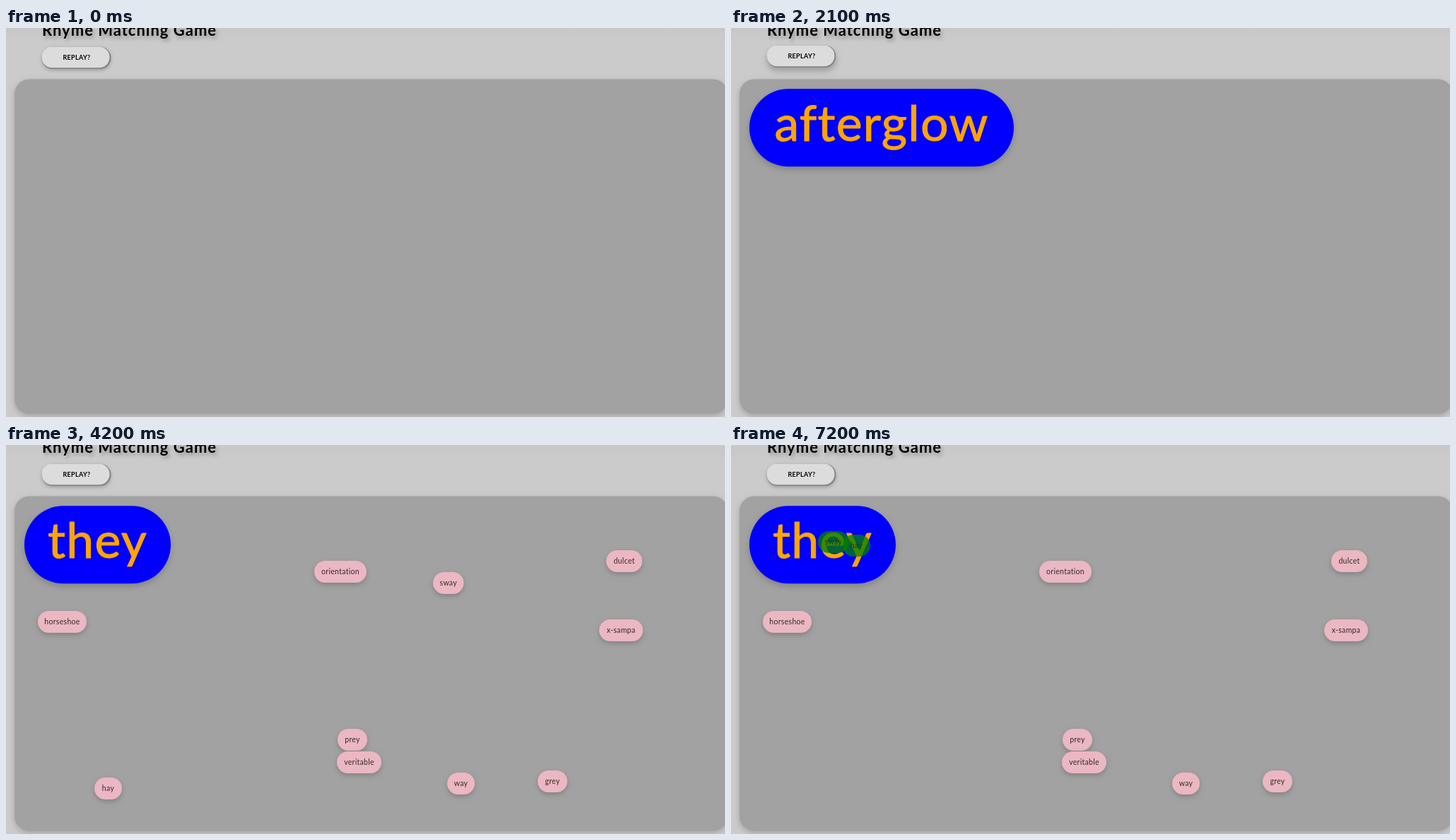
An HTML page with a canvas for the animation above (8 s loop, 1017 by 551 pixels).

```html
<!DOCTYPE html>
<html lang="en">
<head>
<meta charset="utf-8">
<title>Rhyme Matching Game</title>
<style>
html, body { margin: 0; width: 100%; height: 100%; overflow: hidden; background: #cbcbcb; }
canvas { display: block; width: 1017px; height: 551px; }
</style>
</head>
<body>
<canvas id="stage"></canvas>
<script>
const W = 1017, H = 551, LOOP = 8000, STEP = 100;
const FONT = 'Lato, "Open Sans", sans-serif';
const canvas = document.getElementById('stage');
const ctx = canvas.getContext('2d');
const ratio = window.devicePixelRatio || 1;
canvas.width = W * ratio;
canvas.height = H * ratio;

// text, left, top, width
const tags = [
  ['orientation', 436, 164, 74], ['dulcet', 849, 149, 51],
  ['horseshoe', 45, 235, 69], ['x-sampa', 839, 247, 62],
  ['prey', 469, 402, 42], ['veritable', 468, 434, 63],
  ['way', 624, 464, 39], ['grey', 752, 461, 42]
];

// path points: time, left, top
const dragged = [
  { text: 'sway', width: 43.5, drop: 4900, path: [
    [4100, 638, 175.5], [4200, 604, 180], [4400, 445, 185], [4600, 270, 186],
    [4700, 190, 166], [4800, 123, 122]] },
  { text: 'hay', width: 39, drop: 7200, path: [
    [5900, 125, 471], [6100, 139, 415], [6300, 149.5, 351], [6500, 154, 270],
    [6800, 158, 187], [7000, 160, 138], [7100, 158, 127]] }
];

// start, text, optional pill width
const reel = [
  [1700, 'marmalade'], [1800, 'counterrevolutionary thaws'],
  [1900, 'cast off', 298], [2000, 'lantern'],
  [2100, 'afterglow', 374], [2200, 'they', 207]
];

const clamp = v => Math.max(0, Math.min(1, v));
const ease = v => v * v * (3 - 2 * v);
const ramp = (t, from, to) => ease(clamp((t - from) / (to - from)));

function along(path, t) {
  if (t <= path[0][0]) return path[0].slice(1);
  for (let i = 1; i < path.length; i++) {
    const [t0, x0, y0] = path[i - 1], [t1, x1, y1] = path[i];
    if (t <= t1) {
      const k = (t - t0) / (t1 - t0);
      return [x0 + (x1 - x0) * k, y0 + (y1 - y0) * k];
    }
  }
  return path[path.length - 1].slice(1);
}

function shadow(dx, dy, blur, alpha) {
  ctx.shadowOffsetX = dx * ratio;
  ctx.shadowOffsetY = dy * ratio;
  ctx.shadowBlur = blur * ratio;
  ctx.shadowColor = `rgba(0,0,0,${alpha})`;
}

const flat = () => { ctx.shadowColor = 'transparent'; };

function box(x, y, w, h, r, fill) {
  ctx.fillStyle = fill;
  ctx.beginPath();
  ctx.roundRect(x, y, w, h, r);
  ctx.fill();
}

function setFont(size, spacing, weight = 400) {
  ctx.font = `${weight} ${size}px ${FONT}`;
  ctx.letterSpacing = spacing + 'px';
}

function label(text, x, y, fill, align = 'center') {
  ctx.fillStyle = fill;
  ctx.textAlign = align;
  ctx.fillText(text, x, y);
}

function drawTag(text, x, y, w, matched) {
  ctx.globalAlpha = matched ? 0.77 : 1;
  if (!matched) shadow(0, 3, 7, 0.2);
  box(x, y, w, 31, 15.5, matched ? '#008000' : '#ebb7c2');
  flat();
  setFont(10.5, 0.3);
  label(text, x + w / 2, y + 18.5, matched ? '#0a2414' : '#332a2c');
  ctx.globalAlpha = 1;
}

function drawPage() {
  ctx.fillStyle = '#cbcbcb';
  ctx.fillRect(0, 0, W, H);
  const top = ctx.createLinearGradient(0, 0, 0, 22);
  top.addColorStop(0, 'rgba(0,0,0,.015)');
  top.addColorStop(1, 'rgba(0,0,0,0)');
  ctx.fillStyle = top;
  ctx.fillRect(0, 0, W, 22);

  shadow(3, 4, 5, 0.25);
  setFont(22, 1, 700);
  label('Rhyme Matching Game', 51, 11, '#000', 'left');

  shadow(0, 3, 8, 0.2);
  box(12, 72.5, 1009, 474, 21, '#a2a2a2');
  flat();
}

function drawButton(t) {
  const lift = ramp(t, 1300, 1700) - ramp(t, 2700, 3200);
  const y = 26.5 - 2 * lift;
  shadow(0, 2 + 3 * lift, 5 + 4 * lift, 0.22);
  box(50.5, y, 98, 31.5, 15.7, '#858585');
  flat();
  box(50.5, y, 96, 29.8, 14.9, '#dcdcdc');
  setFont(9, 0.35, 700);
  label('REPLAY?', 100, y + 18.5, '#000');
}

function drawWord(t) {
  const entry = reel.filter(e => t >= e[0]).pop();
  if (!entry) return;
  const [, text, width] = entry;
  setFont(70, 1.2);
  const w = width || ctx.measureText(text).width + 62;
  shadow(0, 4, 8, 0.2);
  box(26, 86.3, w, 110, 55, '#0000fc');
  flat();
  label(text, 26 + w / 2, 160, '#ffa500');
  // slightly heavier strokes than the regular weight
  ctx.strokeStyle = '#ffa500';
  ctx.lineWidth = 1;
  ctx.lineJoin = 'round';
  ctx.strokeText(text, 26 + w / 2, 160);
}

function draw(t) {
  ctx.setTransform(ratio, 0, 0, ratio, 0, 0);
  drawPage();
  drawButton(t);
  drawWord(t);
  if (t < 2300) return;
  tags.forEach(tag => drawTag(...tag));
  dragged.forEach(d => {
    const [x, y] = along(d.path, t);
    drawTag(d.text, x, y, d.width, t >= d.drop);
  });
}

const start = performance.now();

function tick() {
  const t = (performance.now() - start) % LOOP;
  draw(Math.floor(t / STEP) * STEP);
  requestAnimationFrame(tick);
}

tick();
</script>
</body>
</html>
```
